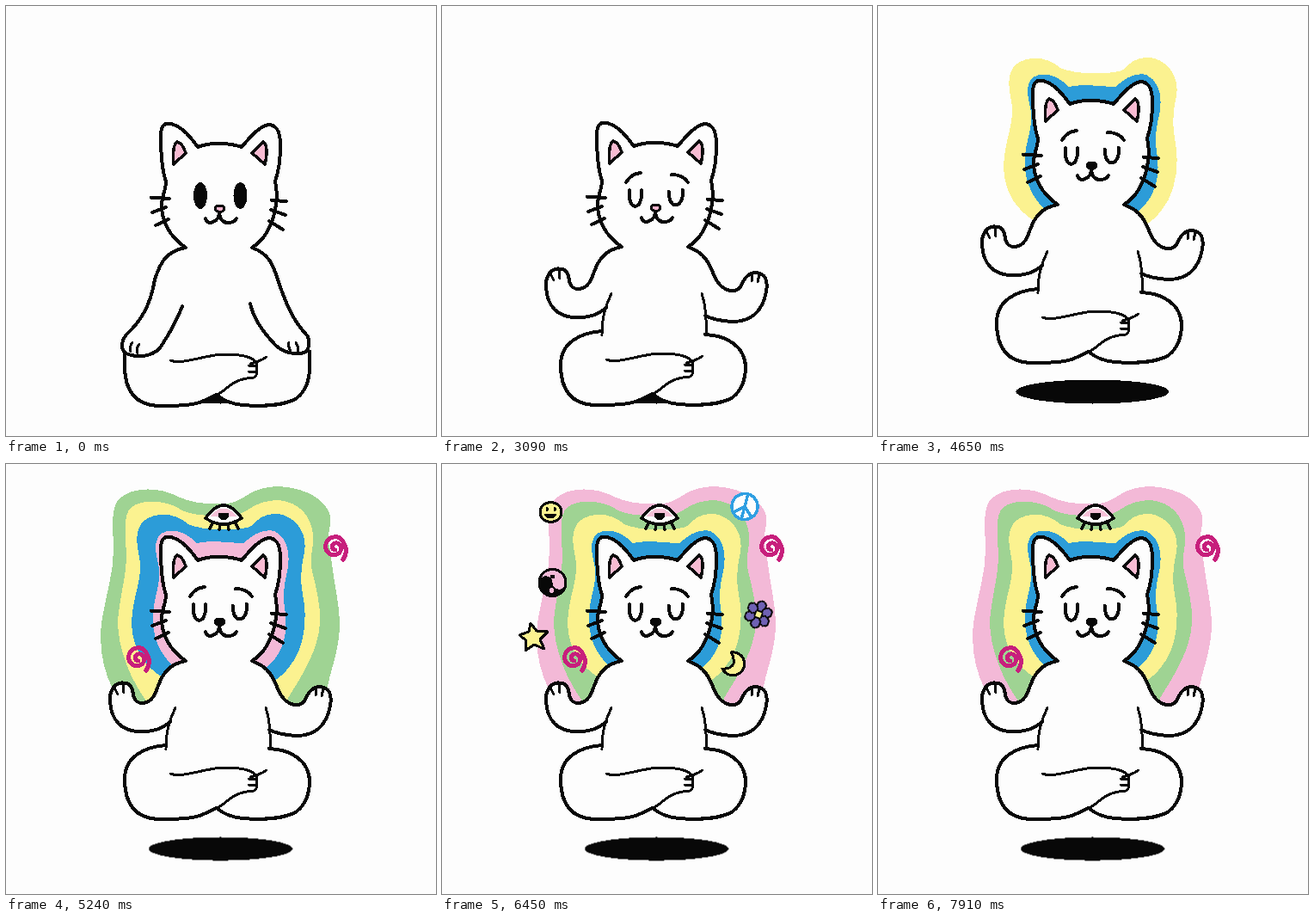
Animation of 500 by 500 pixels, one loop 8000 ms. Source, as an HTML page without scripts:

```html
<!DOCTYPE html>
<html lang="en">
<head>
<meta charset="utf-8">
<title>Meditating cat</title>
<style>
:root {
  --blue: #2c9cd8; --yellow: #fbf290; --green: #9fd393; --pink: #f3b9d7;
  --paper: #fdfdfd; --loop: 8s; --cycle: calc(8s / 11);
}
html, body { margin: 0; width: 100%; height: 100%; overflow: hidden; background: var(--paper); }
svg { display: block; width: 100vw; height: 100vh; }

.ink { stroke: #080808; stroke-width: 4; stroke-linecap: round; stroke-linejoin: round; fill: none; }
.thin { stroke-width: 3; }
.body { fill: var(--paper); }
.t { animation: var(--loop) step-end infinite; }
.c { animation: var(--cycle) step-end infinite; }

/* face */
.open { animation-name: open; }
.closed { animation-name: closed; }
@keyframes open { 0%, 7% { opacity: 1 } 5.375%, 17.875%, 100% { opacity: 0 } }
@keyframes closed { 0%, 7% { opacity: 0 } 5.375%, 17.875%, 100% { opacity: 1 } }
.nose { animation-name: nose; }
@keyframes nose { 0% { fill: #f5b5ce } 54.55%, 100% { fill: #080808 } }

/* arms */
.down { animation-name: down; }
.mid { animation-name: mid; }
.up { animation-name: up; }
.thighs { animation-name: thighs; }
@keyframes down { 0% { opacity: 1 } 25.75%, 100% { opacity: 0 } }
@keyframes mid { 0%, 27%, 100% { opacity: 0 } 25.75% { opacity: 1 } }
@keyframes up { 0% { opacity: 0 } 27%, 100% { opacity: 1 } }
@keyframes thighs { 0% { opacity: 0 } 25.75%, 100% { opacity: 1 } }

/* levitation */
.cat { animation: rise var(--loop) infinite; }
@keyframes rise {
  0% { transform: translateY(0) }
  38.25% { transform: translateY(0); animation-timing-function: steps(55) }
  58.875%, 100% { transform: translateY(-52px) }
}
.shadow { animation-name: shrink; transform-origin: 249.5px 448px; }
@keyframes shrink { 0% { transform: none } 58.875%, 100% { transform: translateY(-1px) scale(.94, .97) } }

/* aura: rings grow one by one, then colours travel outwards */
.g1 { animation-name: g1; fill: var(--blue); }
.g2 { animation-name: g2; fill: var(--yellow); }
.g3 { animation-name: g3; fill: var(--green); }
.flow { animation-name: flow; }
@keyframes g1 { 0% { opacity: 0 } 54.55%, 100% { opacity: 1 } }
@keyframes g2 { 0% { opacity: 0 } 56.82%, 100% { opacity: 1 } }
@keyframes g3 { 0% { opacity: 0 } 59.09%, 100% { opacity: 1 } }
@keyframes flow { 0% { opacity: 0 } 61.36%, 100% { opacity: 1 } }
.ring { animation-name: hue; animation-delay: calc(var(--cycle) * (var(--r) - 4) / 4); }
@keyframes hue {
  0% { fill: var(--pink) } 25% { fill: var(--green) }
  50% { fill: var(--yellow) } 75%, 100% { fill: var(--blue) }
}

/* floating symbols */
.s1 { animation-name: s1; }
.s2 { animation-name: s2; }
.s3 { animation-name: s3; }
@keyframes s1 { 0% { opacity: 0 } 63.5%, 100% { opacity: 1 } }
@keyframes s2 { 0%, 94.5%, 100% { opacity: 0 } 66.8% { opacity: 1 } }
@keyframes s3 { 0%, 83.5%, 100% { opacity: 0 } 70.5% { opacity: 1 } }
.poseA { animation-name: poseA; }
.poseB { animation-name: poseB; }
@keyframes poseA { 0%, 75%, 100% { opacity: 1 } 25% { opacity: 0 } }
@keyframes poseB { 0%, 75%, 100% { opacity: 0 } 25% { opacity: 1 } }
</style>
</head>
<body>
<svg viewBox="0 0 500 500" shape-rendering="crispEdges">
  <defs>
    <path id="r1" d="M197 238C178 220 169 200 171 172C172 155 180 140 178 122C175 105 170 92 180 81C195 73 210 80 222 92C240 88 260 92 276 92C288 82 298 75 312 78C328 86 331 105 327 125C322 145 322 155 325 175C328 205 318 225 301 238Z"/>
    <path id="r2" d="M185 250C160 235 147 215 146 185C147 155 157 140 156 115C154 100 147 80 160 66C178 54 198 58 212 70C230 78 265 78 284 73C294 62 305 55 322 59C342 66 350 85 347 102C343 120 342 135 345 152C351 180 347 215 330 235Q322 246 312 252Z"/>
    <path id="r3" d="M170 285C144 252 130 215 130 182C133 150 140 130 140 105C139 85 135 60 146 50C160 40 188 42 205 54C222 62 250 60 268 59C282 57 288 42 318 42C340 45 354 58 357 82C359 95 352 105 356 125C361 145 366 165 365 185C363 215 348 240 328 272V285Z"/>
    <path id="r4" d="M160 285L126 265C112 240 107 210 112 178C117 150 125 125 125 100C125 80 121 55 130 42C145 26 178 26 200 38C220 47 240 47 258 46C278 43 284 26 318 26C350 28 372 42 377 60C379 76 371 80 377 100C381 140 388 160 388 190C386 225 376 240 372 270L340 285Z"/>
    <path id="spiral" d="M154 229c-5 0-5-7 0-8c8-1 9 10 2 13c-9 3-15-5-13-12c3-9 14-11 19-4c6 8 5 16 1 22" fill="none" stroke="#c71f7c" stroke-width="5" stroke-linecap="round"/>
    <ellipse id="petal" cy="-10" rx="5.500" ry="6"/>
    <path id="midArm" class="ink body" d="M209 281C180 284 176 300 168 325C160 340 148 346 140 344C126 342 120 350 121 362C124 380 150 385 172 374C185 368 192 358 199 340"/>
  </defs>

  <ellipse class="t shadow" cx="249.5" cy="448.5" rx="89" ry="14" fill="#080808"/>

  <g class="cat">
    <g transform="translate(0 52)">
      <use href="#r3" class="t g3"/>
      <use href="#r2" class="t g2"/>
      <use href="#r1" class="t g1"/>
      <g class="t flow">
        <use href="#r4" class="c ring" style="--r:3"/>
        <use href="#r3" class="c ring" style="--r:2"/>
        <use href="#r2" class="c ring" style="--r:1"/>
        <use href="#r1" class="c ring" style="--r:0"/>
      </g>
    </g>

    <path class="body" d="M209 277H286V281L306 330V440H186V330L209 281Z"/>

    <!-- legs -->
    <path class="ink body" d="M138 418C138 442 146 464 178 465C205 465 220 464 230 459L245 452Q256 462 275 464C300 466 325 464 338 456C348 448 353 436 353 420"/>
    <path class="ink thin" d="M191 412C200 416 218 411 232 408C252 403 285 404 291 415Q294 430 288 432C260 434 258 447 245 452M284 416Q296 413 303 408M282 418H290M282 425L290 426"/>
    <path class="ink t thighs" d="M186 379C160 381 138 393 138 418M306 383C333 384 352 398 353 420"/>

    <!-- arms -->
    <g class="t down">
      <path class="ink" d="M138 405V418M353 402V420"/>
      <path class="ink body" d="M209 281C185 285 179 300 173 318C168 350 155 368 140 382C133 391 133 402 142 405C158 410 175 406 182 393Q197 370 205 349"/>
      <path class="ink body" d="M286 281C312 290 312 310 322 335C332 362 342 375 351 384Q354 396 349 402C338 407 322 403 313 394C300 380 288 365 284 346"/>
      <path class="ink thin" d="M145 402Q143 397 147 391M153 404Q151 398 155 393M331 401Q328 397 329 391M340 402Q340 396 337 391"/>
    </g>
    <g class="t mid">
      <use href="#midArm"/>
      <use href="#midArm" transform="translate(496) scale(-1 1)"/>
      <path class="ink thin" d="M190 352Q185 370 186 384M305 350Q307 370 307 384"/>
    </g>
    <g class="t up">
      <path class="ink body" d="M209 281C186 285 180 300 174 318C167 333 151 334 148 321C147 311 144 307 139 307C127 304 120 315 121 328C122 350 135 363 155 363C172 364 182 359 191 352"/>
      <path class="ink body" d="M286 281C308 289 311 302 318 318C327 334 342 336 348 326C352 316 358 311 365 311C377 312 379 321 377 333C373 355 360 368 338 368Q318 367 306 361"/>
      <path class="ink thin" d="M197 335C190 350 185 365 186 384M302 335C307 350 308 365 307 384M126 312L130 320M136 309L137 318M361 313L360 321M369 313L367 322"/>
    </g>

    <!-- head -->
    <path class="ink body" d="M209 281C190 268 181 250 181 232C181 220 186 215 186 204C181 190 180 165 180 150C180 140 184 135 192 137C206 141 215 153 223 164C238 158 260 159 274 164C284 152 296 138 307 138C317 140 319 150 319 163C319 180 316 195 313 204C318 225 312 265 286 281"/>
    <path class="ink" style="fill:#f8bbd2;stroke-width:3.500" d="M199 158C194 161 194 175 195 184L209 171Q205 159 199 158ZM299 158L286 171L301 184C304 174 304 160 299 158Z"/>
    <path class="ink" d="M169 223L190 224M170 240L186 234M174 255L189 248M309 226L326 227M308 237L325 243M306 250L322 260"/>
    <g class="t open">
      <ellipse cx="226" cy="220.500" rx="8" ry="15.500" fill="#080808"/>
      <ellipse cx="272.500" cy="220.500" rx="8" ry="15.500" fill="#080808"/>
    </g>
    <path class="ink t closed" d="M218 215C215 240 234 240 232 215M264 217C263 238 281 238 280 215M214 206Q220 196 231 195M267 197Q280 197 286 206"/>
    <path class="ink" d="M232 247Q234 254 241 251Q248 248 248 240Q249 252 258 252Q266 252 268 247"/>
    <rect class="ink thin t nose" x="243.500" y="232" width="10" height="7" rx="3"/>
  </g>

  <!-- symbols -->
  <g class="t s1">
    <use href="#spiral" class="c poseA"/>
    <use href="#spiral" class="c poseB" x="5" y="-3"/>
    <use href="#spiral" x="229" y="-129"/>
    <g class="c poseA">
      <path class="ink" style="fill:#fdfdfd;stroke-width:3.500" d="M232 63Q253 33 274 63Q253 77 232 63ZM240 69L237 75M249 71L248 76M258 71L259 76M267 69L270 75"/>
      <path d="M238 61Q253 42 268 61Z" fill="#f6c1d8"/>
      <path d="M247 57H259Q260 65 253 65Q246 65 247 57Z" fill="#080808"/>
    </g>
    <g class="c poseB">
      <path class="ink" style="fill:#fdfdfd;stroke-width:3.500" d="M232 62Q253 40 273 62Q253 80 232 62ZM240 53L236 48M248 50L246 44M257 50L259 44M266 53L270 48M240 69L237 75M249 71L248 76M258 71L259 76M266 69L270 75"/>
      <circle cx="253" cy="60.500" r="7" fill="#080808"/>
      <circle cx="253" cy="60.500" r="2" fill="#fdfdfd"/>
    </g>
  </g>

  <g class="t s2">
    <g class="ink thin" style="fill:var(--yellow)">
      <ellipse cx="126.500" cy="56" rx="12.500" ry="11.500"/>
      <path d="M122 51V54M131 51V54M120 59Q126 65 132 59Z"/>
      <path d="M103 185L110 194L123 195L114 204L119 215L107 210L97 217L98 205L90 199L101 195Z"/>
    </g>
    <g transform="translate(368 175) rotate(20)" fill="#6f61b4" stroke="#080808" stroke-width="2">
      <use href="#petal"/>
      <use href="#petal" transform="rotate(60)"/>
      <use href="#petal" transform="rotate(120)"/>
      <use href="#petal" transform="rotate(180)"/>
      <use href="#petal" transform="rotate(240)"/>
      <use href="#petal" transform="rotate(300)"/>
      <circle r="4.500" fill="#fbf290"/>
    </g>
  </g>

  <g class="t s3">
    <g transform="translate(128.500 138)">
      <circle class="ink thin" r="15.500" style="fill:var(--pink)"/>
      <path d="M15.500 0A15.500 15.500 0 0 1-15.500 0A7.750 7.750 0 0 1 0 0A7.750 7.750 0 0 0 15.500 0Z" fill="#080808"/>
      <circle cx="0" cy="-7" r="2.500" fill="#080808"/>
      <circle cx="-1" cy="9" r="3" fill="#f3b9d7"/>
    </g>
    <g transform="translate(352 49.500) rotate(15)" fill="#fdfdfd" stroke="#2f9fe2" stroke-width="3.500">
      <circle r="15"/>
      <path d="M0-15V15M0 0L-11 10M0 0L11 10"/>
    </g>
    <path class="ink thin" style="fill:var(--yellow)" d="M336 219A13.500 13.500 0 1 1 326 238Q336 239 339 232Q340 224 336 219Z"/>
  </g>
</svg>
</body>
</html>
```
